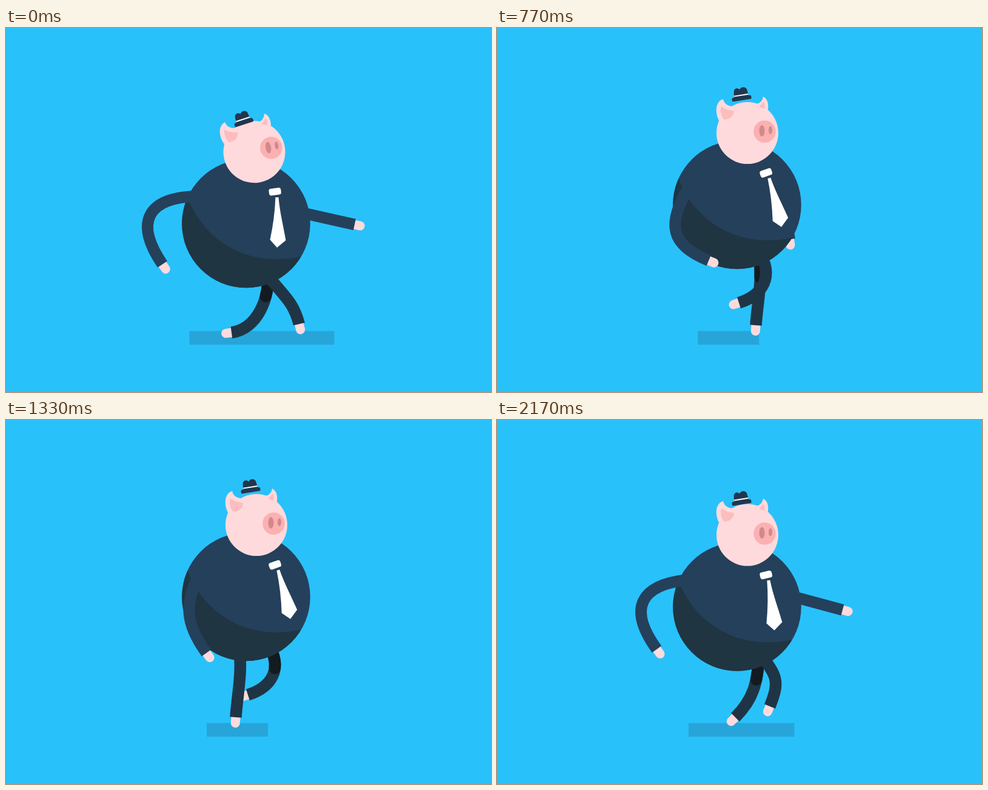
An HTML page with a canvas that plays this animation: 800x600 px, repeating every 2.24 s.

```html
<!DOCTYPE html>
<html lang="en">
<head>
<meta charset="utf-8">
<title>Walking pig</title>
<style>
html, body { margin: 0; width: 100%; height: 100%; overflow: hidden; background: #29c1fa; }
canvas { display: block; }
</style>
</head>
<body>
<canvas width="800" height="600"></canvas>
<script>
const ctx = document.querySelector('canvas').getContext('2d');
const SKY = '#29c1fa', SUIT = '#25405b', SHADE = '#1f3542', TROUSER = '#1f3545', DARK = '#131b20',
      SKIN = '#ffdadc', PINK = '#fcb0b2', EAR = '#fcbdbf', NOSTRIL = '#cf8a8c';
const LOOP = 2240, STEP = 1120, HOP = 560, TICK = 70;

// One step of a foot: time, ankle x and y, direction of the toes in degrees.
const gait = [
  [0, 490, 488, 76], [210, 427, 490, 94], [490, 393, 490, 135],
  [560, 372, 502, 172], [770, 399, 453, 162], [1050, 450, 472, 112]
];

// Turning points of the arm swing: 0 is fully back, 1 fully forward.
const turns = [[0, 0], [560, 1], [1030, 0.06], [1670, 1], [LOOP, 0]];

const mod = (a, n) => (a % n + n) % n;
const mix = (a, b, u) => a + (b - a) * u;
const rad = degrees => degrees * Math.PI / 180;
const wave = (time, peak) => Math.cos((time - peak) / STEP * 2 * Math.PI);

function polar(x, y, degrees, length) {
  return [x + length * Math.cos(rad(degrees)), y + length * Math.sin(rad(degrees))];
}

// Smooth periodic interpolation that comes to rest at turning points.
function footAt(time) {
  const t = mod(time, STEP), n = gait.length;
  const i = gait.findLastIndex(k => k[0] <= t);
  const [a, b, c, d] = [-1, 0, 1, 2].map(k => {
    const [at, ...v] = gait[mod(i + k, n)];
    return { at: at + Math.floor((i + k) / n) * STEP, v };
  });
  const span = c.at - b.at, u = (t - b.at) / span;
  const slope = (p, q, r, j) => (q.v[j] - p.v[j]) * (r.v[j] - q.v[j]) <= 0
    ? 0 : (r.v[j] - p.v[j]) / (r.at - p.at) * span;
  return b.v.map((from, j) => {
    const m0 = slope(a, b, c, j), m1 = slope(b, c, d, j), gap = c.v[j] - from;
    return from + u * (m0 + u * (3 * gap - 2 * m0 - m1 + u * (m0 + m1 - 2 * gap)));
  });
}

function swingAt(time) {
  const t = mod(time, LOOP), i = turns.findIndex(k => k[0] > t);
  const [t0, from] = turns[i - 1], [t1, to] = turns[i];
  return mix(from, to, (1 - Math.cos((t - t0) / (t1 - t0) * Math.PI)) / 2);
}

function stroke(color, width, cap = 'butt') {
  ctx.strokeStyle = color;
  ctx.lineWidth = width;
  ctx.lineCap = cap;
  ctx.stroke();
}

function limb([root, bend1, bend2, end], color, width) {
  const angle = Math.atan2(end[1] - bend2[1], end[0] - bend2[0]);
  ctx.beginPath();
  ctx.moveTo(...end);
  ctx.lineTo(end[0] + 9.5 * Math.cos(angle), end[1] + 9.5 * Math.sin(angle));
  stroke(SKIN, 15, 'round');
  ctx.beginPath();
  ctx.moveTo(...root);
  ctx.bezierCurveTo(...bend1, ...bend2, ...end);
  stroke(color, width);
}

// The near hip shifts back while its foot carries the weight.
function leg(time, bodyY, hipShift) {
  const stance = Math.min(1, Math.max(0, 0.5 + 0.7 * wave(time, 350)));
  const shift = -hipShift * stance * stance * (3 - 2 * stance);
  const [x, y, toes] = footAt(time);
  const hip = [432 + shift, bodyY + 77], ankle = [x + shift, y];
  const thigh = polar(...hip, 70 + 25 * wave(time, 400), 48);
  limb([hip, thigh, polar(...ankle, toes, -42), ankle], TROUSER, 19.5);
}

// Arms are drawn relative to the height of the body; elbows trail the hands.
function arms(time) {
  const f = swingAt(time), sag = Math.sin(f * Math.PI);
  const drag = (swingAt(time - 100) - f) * sag;
  const elbow = (x0, y0, x1, y1) =>
    [mix(x0, x1, f) - 60 * drag, mix(y0, y1, f) + 25 * sag + 30 * drag];
  const near = [
    [mix(314, 326, f), mix(-45, -33, f)],
    elbow(235, -43, 328, 33), elbow(210, -4, 362, 59),
    [mix(258, 408, f), mix(67, 72, f) + 23 * sag]
  ];
  const shoulder = [470, -22];
  const hand = [575 - 215 * f + 150 * drag, 1.5 + 70 * f + 50 * drag];
  const far = [0, 1 / 3, 2 / 3, 1].map(u => shoulder.map((v, j) => mix(v, hand[j], u)));
  return { near, far };
}

function oval(x, y, rx, ry, color) {
  ctx.beginPath();
  ctx.ellipse(x, y, rx, ry, 0, 0, 7);
  ctx.fillStyle = color;
  ctx.fill();
}

function shape(path, color) {
  ctx.fillStyle = color;
  ctx.fill(new Path2D(path));
}

function at(x, y, degrees, paint) {
  ctx.save();
  ctx.translate(x, y);
  ctx.rotate(rad(degrees));
  paint();
  ctx.restore();
}

function body() {
  oval(0, 0, 105.8, 105.8, SUIT);
  ctx.save();
  ctx.clip();
  shape('M-97-45C-72 25 0 74 91 54L130 46V120H-130V-120Z', SHADE);
  ctx.restore();
}

function hat() {
  shape('M-15 0Q-17-1-15.5-6L-12-6.5L-11-16C-10-22-3-22-1-18C2-23 10-22 11-16L12-6.5L15.5-6Q17-1 15 0Z', '#21374f');
  ctx.fillStyle = '#fff';
  ctx.fillRect(-11.7, -9.5, 23.4, 2);
}

function head(lift) {
  shape('M-40-56C-49-53-52-44-51-34Q-50-24-45-18L-12-46C-26-41-38-45-40-56Z', SKIN);
  shape('M26-60C34-56 36-46 33-34L10-47C19-47 25-52 26-60Z', SKIN);
  oval(0, 0, 51, 51, SKIN);
  shape('M-43-44Q-34-37-22-36.5C-22-27-31-21-39-22.5C-44-29-45-38-43-44Z', EAR);
  shape('M19-44Q24-47 26-52Q30-47 28-40Q23-41 19-44Z', EAR);
  oval(28.5, -2.3, 18.3, 18.3, PINK);
  oval(24, -3.5, 4.5, 9.5, NOSTRIL);
  oval(38, -4.7, 3, 6.5, NOSTRIL);
  at(-9, -47.5 - 6.8 * lift, -9, hat);
}

function knot() {
  ctx.beginPath();
  ctx.roundRect(-10, -5.7, 20, 11.4, 3.5);
  ctx.fillStyle = '#fff';
  ctx.fill();
}

function draw(time) {
  const hop = time % HOP, lift = 1 - (2 * hop / HOP - 1) ** 2;
  const y = 322.5 - 33 * lift;
  const nod = hop < 180 ? -9 * Math.cos(hop / 360 * Math.PI) ** 2 : 0;
  const { near, far } = arms(time);

  ctx.fillStyle = SKY;
  ctx.fillRect(0, 0, 800, 600);
  ctx.fillStyle = '#27a5d9';
  ctx.fillRect(302.5 + 30.5 * lift, 499.5, 239 - 147 * lift, 22.5);

  leg(time + STEP / 2, y, 0);
  // The body's shadow falls on the far thigh.
  ctx.setLineDash([43, 999]);
  stroke(DARK, 19.5, 'round');
  ctx.setLineDash([]);

  at(0, y, 0, () => limb(far, SUIT, 19));
  leg(time, y, 48);
  at(396, y, 0, body);
  at(0, y, 0, () => limb(near, SUIT, 19));
  at(413, y - 96.5, nod, () => {
    ctx.translate(0, -22);
    head(lift);
  });
  at(445.5, y - 51.5, -15 * lift, () =>
    shape('M-1 8H4C6 32 12 55 16 79L1.5 91L-10 78C-5 55-2 32-1 8Z', '#fff'));
  at(443.7, y - 52.7, -8 - 12 * lift, knot);
}

const start = performance.now();
function frame() {
  const time = Math.max(0, performance.now() - start) % LOOP;
  draw(Math.floor(time / TICK) * TICK);
  requestAnimationFrame(frame);
}
frame();
</script>
</body>
</html>
```
